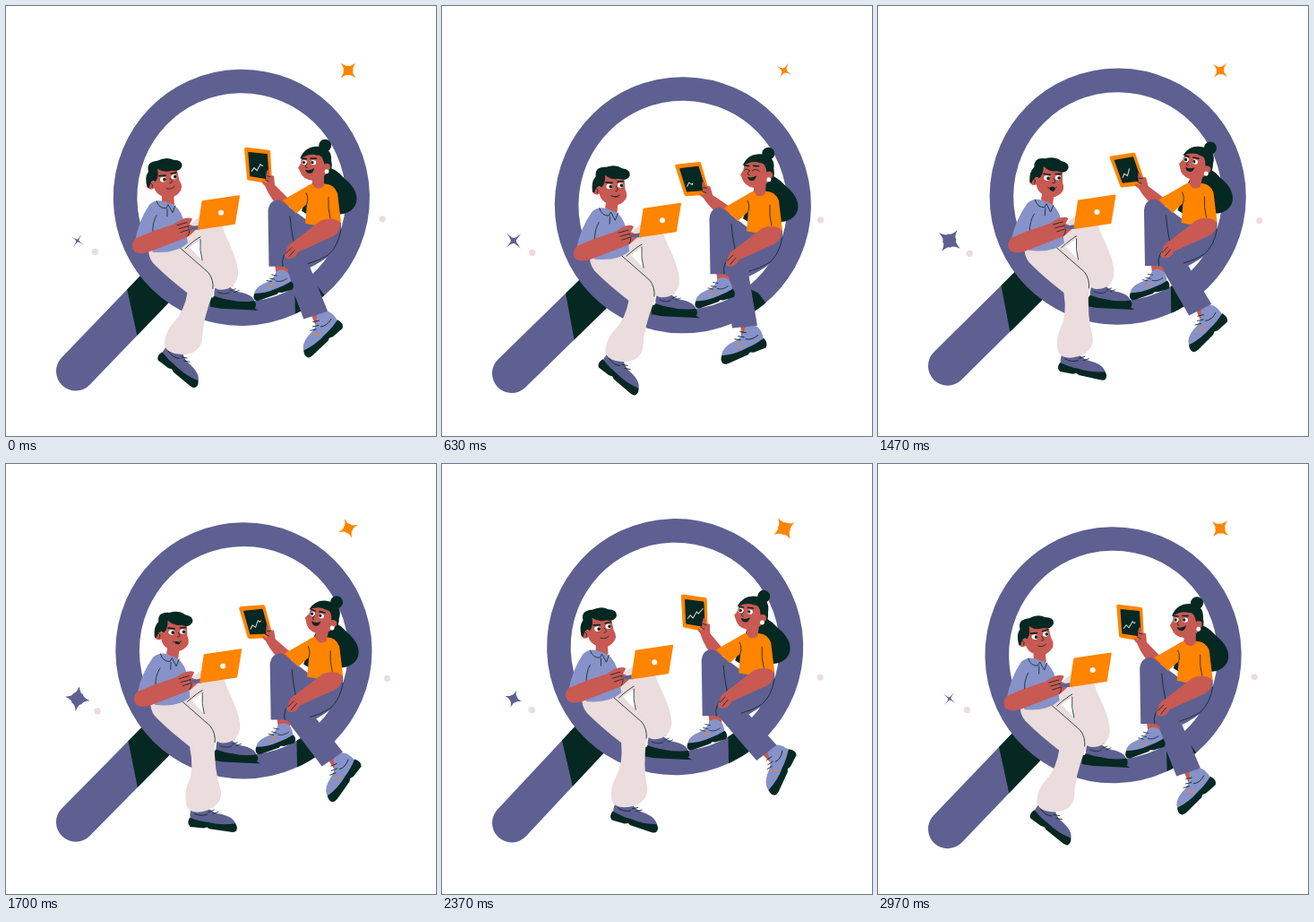
An HTML page that plays this animation: 480x480 px, repeating every 3 s.

```html
<!DOCTYPE html>
<html lang="en">
<head>
<meta charset="utf-8">
<title>Search illustration</title>
<style>
  html, body { margin: 0; width: 100%; height: 100%; overflow: hidden; background: #fff; }
  svg { display: block; width: 100vw; height: 100vh; }
  .violet { fill: #5e6091; }
  .blue { fill: #8792c8; }
  .dark { fill: #062822; }
  .skin { fill: #c85953; }
  .orange { fill: #ff8400; }
  .cream { fill: #ebdcdd; }
  .white { fill: #fff; }
  .line { fill: none; stroke: #062822; stroke-width: .8; stroke-linecap: round; stroke-linejoin: round; }
  .brow { stroke-width: 1.6; }
</style>
</head>
<body>
<svg viewBox="0 0 480 480">
  <defs>
    <clipPath id="shadows">
      <path d="M322 300L347 312L360 329L336 352H323ZM227 316H240L282 340L240 338L228 336Z"/>
    </clipPath>
    <g id="shoe">
      <path d="M-3 20Q-6 6 0 2Q5 -2 12 0Q18 8 28 9Q47 10 50 20Q30 25 -3 20Z"/>
      <path class="dark" d="M-4 17Q8 20 18 20Q34 22 49 18Q53 22 51 26Q50 28 45 28L20 27L17 25.5L13 27H-2Q-7 24 -4 17Z"/>
      <path class="line" d="M13 5l6 -3M17 8.5l6 -3M22 10l6 -3M1 12Q10 15 16 11"/>
    </g>
  </defs>

  <path id="sparkA" class="orange"/>
  <path id="sparkB" class="violet"/>
  <circle id="dotA" class="cream" r="3.7"/>
  <circle id="dotB" class="cream" r="3.6"/>

  <g id="lens">
    <path class="violet" d="M0 -21H145V22.7H0A21.8 21.8 0 0 1 0 -21Z"/>
    <path class="dark" d="M105.6 -21H145V22.7H76.2Z"/>
    <circle cx="268" r="129.8" fill="none" stroke="#5e6091" stroke-width="26.6"/>
  </g>

  <g id="people">
    <circle cx="263" cy="214" r="129.8" fill="none" stroke="#062822" stroke-width="26.6" clip-path="url(#shadows)"/>

    <!-- man -->
    <use href="#shoe" class="violet" transform="translate(237 309) rotate(6) scale(.86 .9)"/>
    <path class="cream" d="M190 268L207 243Q222 228 234 237Q242 244 244 254Q260 286 259 300Q257 317 239 317Q229 316 222 300L219 287L217 261L203 271Z"/>
    <g id="manShin">
      <g id="manFoot">
        <path class="skin" d="M182 378L198 380L196 394L182 390Z"/>
        <use href="#shoe" class="violet" transform="translate(187 375) rotate(39) scale(.97 1)"/>
      </g>
      <path class="cream" d="M203 318Q206 303 219 302Q232 304 232 319Q219 350 218 374Q214 389 196 389Q177 388 176 376Q178 362 187 353Q199 341 203 318Z"/>
    </g>
    <path class="cream" d="M159 274Q158 266 170 266L198 262L228 294Q235 308 231 319Q217 331 203 321Q181 304 167 290Q160 284 159 274Z"/>
    <path class="line" d="M200 271Q211 261 217 258M217 261Q216 273 219 284M194 270L226 298Q232 306 231 316"/>
    <g id="manTorso">
      <g id="manHead">
        <path class="skin" d="M174 203L187 207L188 222Q181 228 174 218Z"/>
        <circle class="skin" cx="162" cy="200" r="5"/>
        <path class="skin" d="M164 183Q180 177 191 184L193.5 195Q199 203 193 209Q187 216 177 213.5Q167 211 165 202Z"/>
        <path class="dark" d="M158 203Q154 192 159 185Q156 174 169 173Q179 168 187 172Q197 172 196.500 179Q194 186 185 184Q177 187 169 182Q171 191 167 196Q161 193 160 203Z"/>
        <ellipse class="white" cx="175.5" cy="194" rx="3.5" ry="2.8"/>
        <ellipse class="white" cx="187.500" cy="191" rx="3.2" ry="2.7"/>
        <circle class="dark" cx="177" cy="194" r="1.9"/>
        <circle class="dark" cx="188.8" cy="191" r="1.8"/>
        <path class="line brow" d="M171 190L178 189.5M184 187.500L190 186"/>
        <path class="line" d="M183 193Q188 198 183 198M179 204Q184 206 188 202M160 198Q165 198 163 203"/>
        <ellipse id="manMouth" class="dark" cx="184" cy="204.5" rx="3"/>
      </g>
      <path class="blue" d="M160 222Q167 216 175 218L187 222Q197 229 200 246L203 265Q190 277 164 275L158 264L144 263Q148 240 160 222Z"/>
      <path class="line" d="M168 218Q171 227 179 226L181 222L186 231L189 223M180 227V235M168 234Q163 243 164 254"/>
    </g>
    <path class="skin" d="M144 260Q138 267 143 274Q150 279 164 273L203 258Q209 253 214 248L205 244L208 238Q204 235 195 239L187 244L163 252Z"/>
    <path class="line" d="M191 245L202 242M193 249L204 246M195 253L204 250M203 246Q207 251 203 257"/>
    <path d="M203 247L216 245V250L204 250Z" class="violet"/>
    <path class="orange" stroke="#ff8400" stroke-width="2" stroke-linejoin="round" d="M219.500 218.500L260 212.500L255 243L215 249Z"/>
    <circle class="white" cx="240" cy="231" r="3"/>

    <!-- woman -->
    <path class="dark" d="M352 178Q367 180 378 193Q394 206 391 220Q386 234 366 233Q345 240 330 229Q337 205 352 178Z"/>
    <g id="womanForearm">
      <g id="tablet">
        <path class="orange" stroke="#ff8400" stroke-width="4" stroke-linejoin="round" d="M268 160L293 163L295 197L271 193Z"/>
        <path class="dark" stroke="#062822" stroke-width="1.5" stroke-linejoin="round" d="M271 164L291 166L293 193L273 190Z"/>
        <path id="graph" fill="none" stroke="#e8dada" stroke-width="1" pathLength="1" d="M274 185L277 181L280 184L284 177L286 179L291 173"/>
      </g>
      <path class="skin" d="M291 198L290 190L291 184Q294 182 294 189L299 190L300 200L317 217Q318 227 309 228Q296 218 289 201Q285 198 286 195Z"/>
      <path class="line" d="M289 194L293 196M291 190L295 191"/>
    </g>
    <g id="womanShin">
      <g id="womanFoot">
        <path class="skin" d="M338 342L353 338L358 352L344 357Z"/>
        <use href="#shoe" class="blue" transform="translate(354 340) rotate(-40) scale(-.96 1.08)"/>
        <path fill="none" stroke="#ff8400" d="M341 367L349 369"/>
      </g>
      <path class="violet" d="M308 285Q308 270 322 271Q333 274 339 292L358 342L331 350Z"/>
    </g>
    <path class="skin" d="M300 287H315L315 300L302 303Z"/>
    <use href="#shoe" class="blue" transform="translate(311 294) rotate(-17) scale(-.82 .9)"/>
    <path fill="none" stroke="#ff8400" d="M293 314L300 311"/>
    <path class="violet" d="M336 239L374 242Q375 266 361 279Q346 290 331 296Q312 299 308 285Q309 274 322 266Z"/>
    <path class="violet" d="M292.500 229Q294 216 306 217L338 241L344 268L318 282L313 291H293.500Z"/>
    <path class="line" d="M317 235Q318 249 321 263M309 291Q306 278 319 269M374 250Q371 268 360 278Q349 285 337 288"/>
    <path class="orange" d="M335 202Q343 196 352 199Q365 197 370 209L374 242Q354 248 334 243L336 221L324 232L309 217Q321 210 335 202Z"/>
    <path class="skin" d="M351 240Q364 235 372 241Q376 250 366 257L326 275Q322 284 313 282Q309 279 313 274Q314 266 320 264Z"/>
    <path class="line" d="M313 276L319 270M316 280L322 273M336 221Q338 214 335 209M360 214Q359 226 362 237"/>
    <g id="womanHead">
      <path class="skin" d="M341 190L355 186L355 201Q347 208 342 199Z"/>
      <path class="skin" d="M330 168Q341 160 357 168Q364 178 360 185Q352 195 342 195Q331 194 328 185L326 181L329 176Z"/>
      <circle class="dark" cx="356" cy="156" r="7"/>
      <path class="dark" d="M328 171Q333 157 348 157Q364 158 363 173Q365 181 361 187Q357 184 355 176Q353 166 347 167Q339 164 328 171Z"/>
      <circle class="skin" cx="358" cy="180" r="4"/>
      <circle class="white" cx="358" cy="185" r="2.5"/>
      <g id="womanEyes">
        <ellipse class="white" cx="333" cy="175" rx="2.7" ry="2.6"/>
        <ellipse class="white" cx="343" cy="175" rx="3.1" ry="2.6"/>
        <circle class="dark" cx="332.3" cy="175" r="1.7"/>
        <circle class="dark" cx="341.8" cy="175" r="1.7"/>
      </g>
      <path id="womanLids" class="line" d="M330 176Q333 173 336 176M339 176Q343 173 347 176"/>
      <path class="line brow" d="M330 170.500L335 171M340 170.500L346 170.500"/>
      <path class="line" d="M336 176Q332 181 336 181"/>
      <path class="dark" d="M334 183Q339 185 344 181Q343 188 338 187Q335 187 334 183Z"/>
    </g>
  </g>
</svg>
<script>
  const LOOP = 3000, RAD = Math.PI / 180;
  const part = {};
  document.querySelectorAll('svg [id]').forEach(el => part[el.id] = el);

  const set = (id, name, value) => part[id].setAttribute(name, value);
  const turn = (id, angle, x, y) => set(id, 'transform', `rotate(${angle} ${x} ${y})`);

  function spark(id, x, y, outer, inner, angle) {
    const at = (radius, deg) =>
      `${x + radius * Math.cos(deg * RAD)} ${y + radius * Math.sin(deg * RAD)}`;
    let d = 'M' + at(outer, angle);
    for (let i = 0; i < 4; i++) {
      const a = angle + i * 90;
      d += `Q${at(inner * .75, a + 22)} ${at(inner, a + 45)}`;
      d += `Q${at(inner * .75, a + 68)} ${at(outer, a + 90)}`;
    }
    set(id, 'd', d + 'Z');
  }

  function draw(time) {
    const phase = time / LOOP * 360;
    const wave = (mean, size, shift) => mean + size * Math.sin((phase + shift) * RAD);
    const near = (moment, span) => Math.abs(time - moment) < span;

    // The lens swings about the rounded end of its handle.
    const cx = wave(265.1, 5, -25), cy = wave(213, 9.3, 4);
    const ex = 77.2, ey = wave(404, 5.8, 32);
    const tilt = Math.atan2(cy - ey, cx - ex) / RAD;
    set('lens', 'transform', `translate(${ex} ${ey}) rotate(${tilt})`);
    set('people', 'transform', `translate(${cx - 263} ${cy - 214})`);

    const lean = wave(6, 6.8, -62);
    turn('manTorso', lean * .24, 185, 272);
    turn('manHead', lean * .76, 182, 222);
    set('manMouth', 'ry', Math.max(0, wave(-.5, 3.3, -60)));
    turn('manShin', wave(-10, -12, -130), 217, 320);
    turn('manFoot', wave(-5.5, -6, -130), 192, 382);

    turn('womanHead', wave(6.8, 7, -110), 346, 203);
    const blink = near(630, 70) || near(1970, 110);
    set('womanEyes', 'visibility', blink ? 'hidden' : 'visible');
    set('womanLids', 'visibility', blink ? 'visible' : 'hidden');
    turn('womanForearm', wave(-3.7, -9, -25), 313, 222);
    turn('tablet', wave(-3.7, -3.7, -100), 290, 194);
    set('graph', 'stroke-dasharray', `${Math.min(1, wave(.7, -.34, -10))} 2`);
    turn('womanShin', wave(-6.3, 17.5, 17), 318, 284);
    turn('womanFoot', wave(4, 6, -40), 348, 346);

    spark('sparkA', 382, 72, wave(11.5, -2, -15), wave(5, -2.3, -15), 45 + phase);
    spark('sparkB', 79.8, 262, wave(11.6, 3.1, -70), wave(4.7, 3.2, -105), 33 - phase);
    set('dotA', 'cx', wave(100.8, 1.5, -80));
    set('dotA', 'cy', wave(275.3, 1, -60));
    set('dotB', 'cx', wave(423, 2.8, -85));
    set('dotB', 'cy', wave(238.7, 1, -60));
  }

  function frame() {
    draw(performance.now() % LOOP);
    requestAnimationFrame(frame);
  }
  frame();
</script>
</body>
</html>
```
